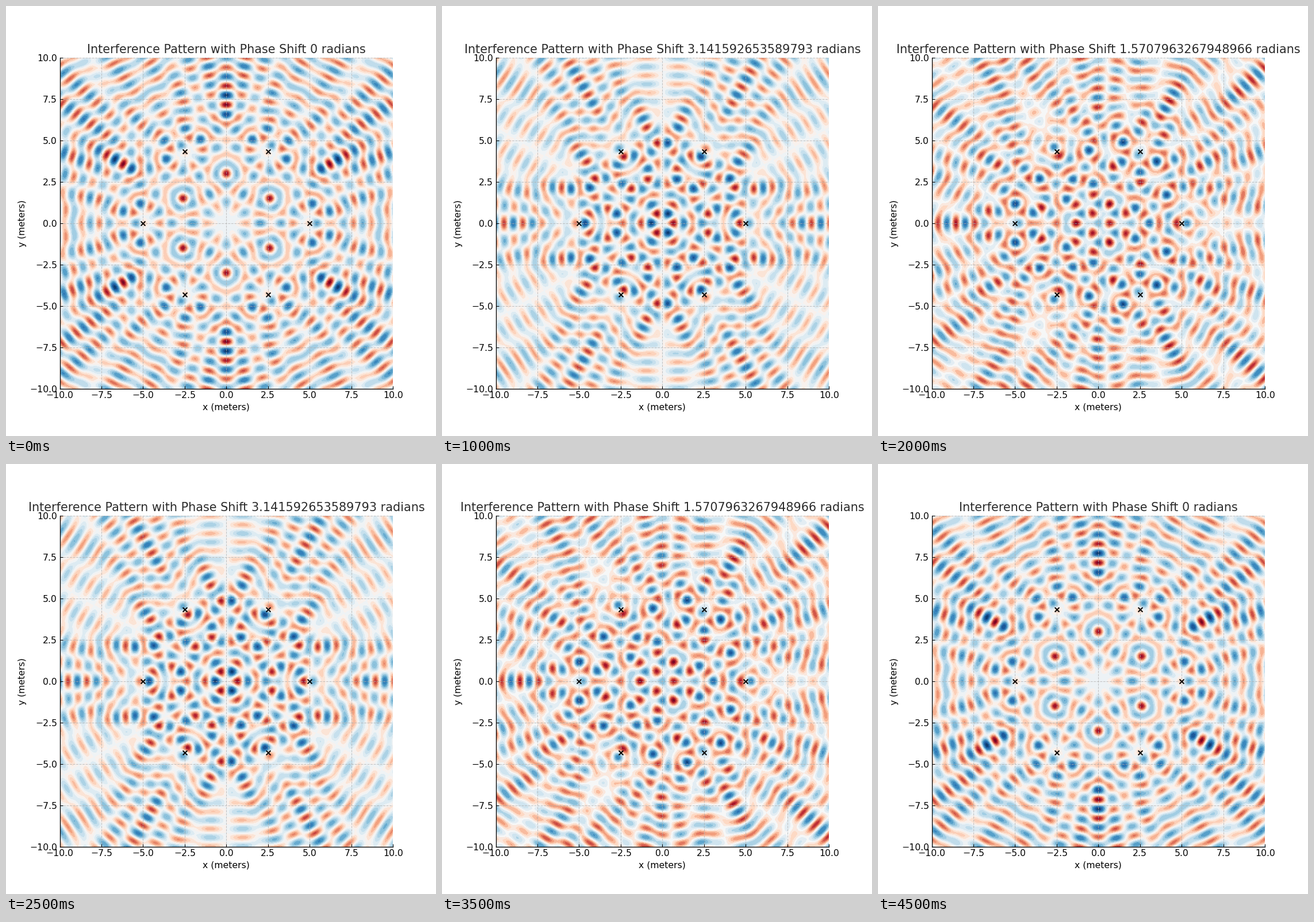
Animation, 748 px wide and 748 px high, one loop 5 s. Source, as a matplotlib script:

```python
import numpy as np
import matplotlib.pyplot as plt
from matplotlib.animation import FuncAnimation

plt.rcParams.update({
    "font.family": "DejaVu Sans",
    "font.size": 12,
    "axes.spines.top": False,
    "axes.spines.right": False,
    "axes.linewidth": 1.0,
    "xtick.direction": "in",
    "ytick.direction": "in",
})

WAVELENGTH = 1.0
K = 2 * np.pi / WAVELENGTH
RADIUS = 5
SHIFTS = [0, np.pi / 2, np.pi]

angles = np.arange(6) * np.pi / 3
sources = RADIUS * np.column_stack([np.cos(angles), np.sin(angles)])
axis = np.linspace(-10, 10, 500)
X, Y = np.meshgrid(axis, axis)


def field(shift):
    """Sum of six circular waves; every other source is shifted."""
    total = np.zeros_like(X)
    for i, (sx, sy) in enumerate(sources):
        phase = shift if i % 2 == 0 else 0
        total += np.sin(K * np.hypot(X - sx, Y - sy) + phase)
    return total


fig, ax = plt.subplots(figsize=(8, 8), dpi=93.5)
layers = [ax.contourf(X, Y, field(s), levels=20, cmap="RdBu") for s in SHIFTS]
ax.scatter(*sources.T, color="black", marker="x", s=36, linewidths=1.5, zorder=3)
ax.grid(True, linestyle="--", linewidth=0.8, color="#b0b0b0", alpha=0.7)
ax.set(xlim=(-10, 10), ylim=(-10, 10), xlabel="x (meters)", ylabel="y (meters)")
title = ax.set_title("", fontsize=16, color="#2b2b2b")


def update(frame):
    step = frame % len(SHIFTS)
    for i, layer in enumerate(layers):
        layer.set_visible(i == step)
    title.set_text(f"Interference Pattern with Phase Shift {SHIFTS[step]} radians")
    return [*layers, title]


anim = FuncAnimation(fig, update, frames=10, interval=500, repeat=True,
                     repeat_delay=0, blit=False)
plt.show()
```
